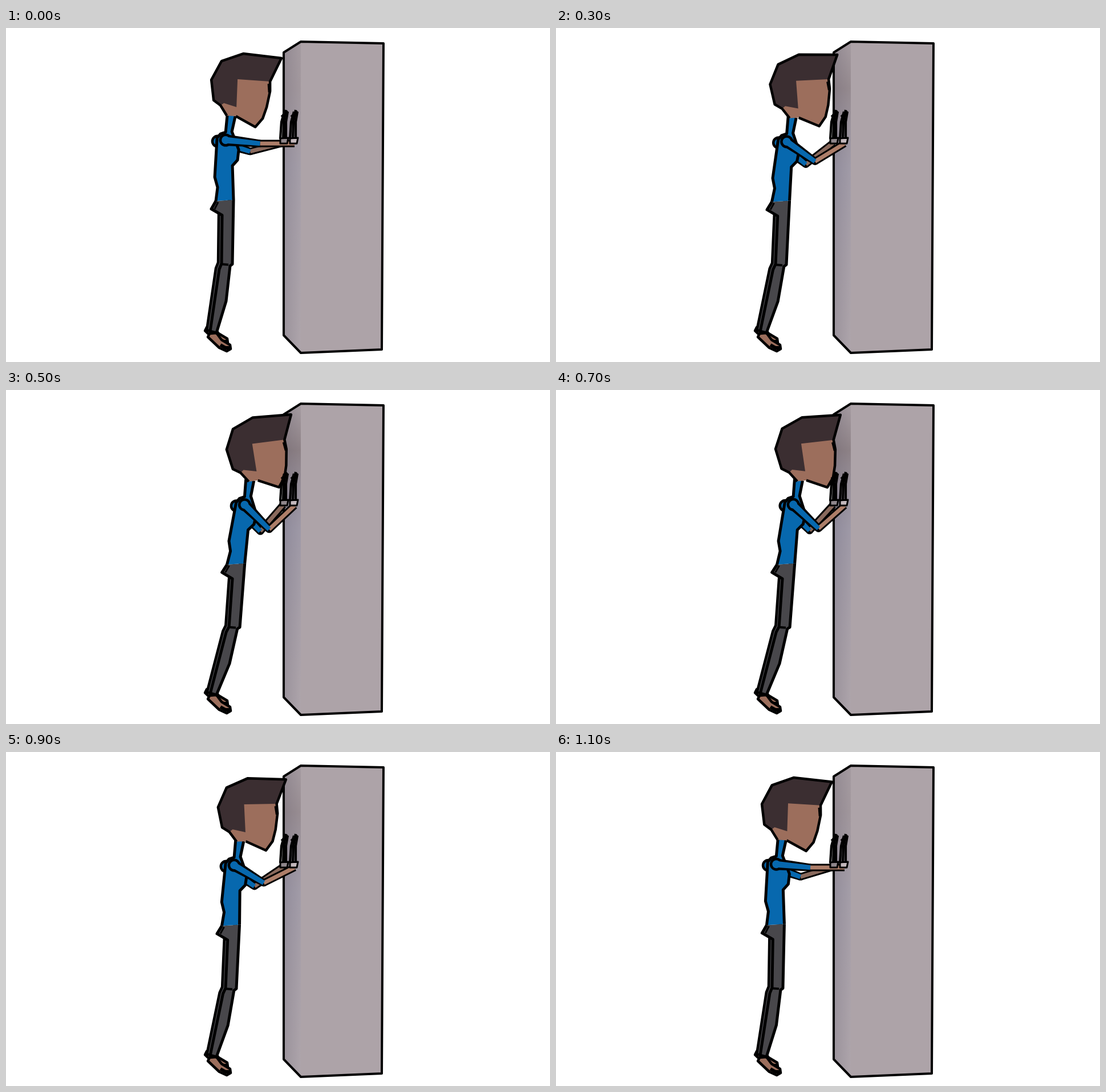
An HTML page with a canvas for the animation above (1.2 s loop, 954 px wide and 587 px high).

```html
<!DOCTYPE html>
<html lang="en">
<head>
<meta charset="utf-8">
<title>Wall push-up</title>
<style>
  html, body { margin: 0; width: 100%; height: 100%; overflow: hidden; background: #fff; }
  canvas { display: block; }
</style>
</head>
<body>
<canvas id="stage" width="954" height="587"></canvas>
<script>
const ctx = document.getElementById('stage').getContext('2d');
const LOOP = 1200, STEP = 100;
const INK = '#000', HAIR = '#3b2e31', SKIN = '#9c6e5c', BLUE = '#0768ae', PANTS = '#48474b';
const ARM = 59;       // length of upper arm and of forearm
const LEAD = 25;      // ms by which the upper body runs ahead of the hips

const swing = t => (1 - Math.cos(2 * Math.PI * t / LOOP)) / 2;
const mix = (a, b, u) => a + (b - a) * u;
const move = (pts, dx, dy) => pts.map(([x, y]) => [x + dx, y + dy]);

// Body points slide sideways by an amount that depends on their height
function leaner(top, low) {
  const joints = [[155, 34 * top], [195, 35 * top], [303, 21 * low], [415, 14 * low], [535, 0]];
  return ([x, y]) => {
    let i = 0;
    while (i < 3 && y > joints[i + 1][0]) i++;
    const [y0, d0] = joints[i], [y1, d1] = joints[i + 1];
    const d = mix(d0, d1, Math.max(0, Math.min(1, (y - y0) / (y1 - y0))));
    return [x + d, y + d * 0.14];
  };
}

// The elbow hangs below the line from shoulder to wrist
function elbowOf([ax, ay], [bx, by]) {
  const dx = bx - ax, dy = by - ay, reach = Math.hypot(dx, dy);
  const drop = Math.sqrt(Math.max(0, ARM * ARM - reach * reach / 4)) + 3;
  return [(ax + bx) / 2 - dy / reach * drop, (ay + by) / 2 + dx / reach * drop];
}

function trace(pts) {
  ctx.beginPath();
  pts.forEach(([x, y]) => ctx.lineTo(x, y));
}
function fill(pts, color) {
  trace(pts);
  ctx.fillStyle = color;
  ctx.fill();
}
function line(pts, width = 5, closed = false) {
  trace(pts);
  if (closed) ctx.closePath();
  ctx.lineWidth = width;
  ctx.strokeStyle = INK;
  ctx.stroke();
}
function shape(pts, color, width = 5, closed = true) {
  fill(pts, color);
  line(pts, width, closed);
}
function dot([x, y], r, color) {
  ctx.beginPath();
  ctx.arc(x, y, r, 0, Math.PI * 2);
  ctx.fillStyle = color;
  ctx.fill();
}
function limb(a, b, wa, wb, color) {
  const dx = b[0] - a[0], dy = b[1] - a[1], len = Math.hypot(dx, dy);
  const side = ([x, y], w) => [x - dy / len * w / 2, y + dx / len * w / 2];
  fill([side(a, wa), side(b, wb), side(b, -wb), side(a, -wa)], color);
}

function drawArm(shoulder, wrist, skin) {
  const elbow = elbowOf(shoulder, wrist);
  dot(shoulder, 11.5, INK);
  limb(shoulder, elbow, 20, 13, INK);
  dot(elbow, 6.5, INK);
  limb(elbow, wrist, 13, 13, INK);
  limb(elbow, wrist, 7, 7, skin);
  limb(shoulder, elbow, 11, 8, BLUE);
  dot(shoulder, 7, BLUE);
}

function drawBlock(near) {
  const outline = [[517, 24], [662, 27], [659, 565], [517, 571], [487, 540], [487, 43]];
  fill(outline, '#ada3a8');
  const edge = ctx.createLinearGradient(487, 0, 517, 0);
  edge.addColorStop(0, '#9b939c');
  edge.addColorStop(1, '#aea5ab');
  const shade = ctx.createLinearGradient(0, 30, 0, 571);
  shade.addColorStop(0, 'rgba(75,58,60,.1)');
  shade.addColorStop(0.14, `rgba(75,58,60,${mix(0.12, 0.35, near)})`);
  shade.addColorStop(0.4, `rgba(95,105,150,${mix(0.12, 0.2, near)})`);
  shade.addColorStop(1, 'rgba(120,115,135,0)');
  for (const paint of [edge, shade]) {
    fill([[487, 43], [517, 24], [517, 571], [487, 540]], paint);
  }
  line(outline, 4, true);
}

function drawLegs(at) {
  const foot = [[357, 537], [354, 543], [374, 562], [387, 568], [394, 564], [393, 557], [378, 548], [369, 536]];
  const leg = [[399, 302], [397, 415], [393, 418], [386, 480], [369, 536],
    [358, 533], [374, 424], [378, 414], [379, 329]];
  const hip = [[360, 318], [368, 304]];
  for (const [dx, dy] of [[-5, -11], [0, 0]]) {
    shape(move(foot, dx, dy), SKIN, 4.5);
    line(move([[376, 557], [385, 562], [393, 562]], dx, dy), 6);
  }
  shape(move(leg, -6, -2).map(at), PANTS, 4.5);
  shape(leg.concat(hip).map(at), PANTS, 5, false);
  line([[372, 306], [366, 318]].map(at), 3);
  line([[377, 415], [390, 416]].map(at), 4);
}

function drawTorso(at) {
  const back = [[368, 304], [371, 280], [366, 262], [370, 193], [376, 186], [385, 183], [388, 152]].map(at);
  const front = [[402, 155], [396, 182], [408, 214], [406, 232], [397, 242], [399, 302]].map(at);
  fill(back.concat(front), BLUE);
  line(back);
  line(front);
}

function drawHead(lean) {
  ctx.save();
  ctx.translate(424 + 26.5 * lean, 90.5 + lean);
  ctx.rotate(-11.8 * lean * Math.PI / 180);
  ctx.translate(-424, -90.5);
  const crown = [[463, 94], [483, 53], [416, 45], [378, 58], [360, 91], [364, 127], [376, 136]];
  const jaw = [[387, 154], [403, 155], [437, 174], [450, 159], [457, 139], [463, 111]];
  fill(crown.concat(jaw), SKIN);
  fill(crown.concat([[382, 132], [404, 139], [406, 90]]), HAIR);
  line([...jaw.slice(1), ...crown, jaw[0]], 4.5);
  line([[461, 98], [462, 113]], 5);
  ctx.restore();
}

function drawHands() {
  for (const [x, palm] of [[481, '#8f868b'], [498, '#c3b8bc']]) {
    shape([[x, 194], [x + 14, 193], [x + 12, 203], [x, 203]], palm, 3);
    for (let i = 0; i < 3; i++) {
      line([[x + 5 * i, 195], [x + 2 + 4 * i, 165], [x + 7 + 3 * i, 147 - 3 * (i % 2)]], 4.2);
    }
    line([[x + 2, 156], [x + 13, 146]], 4);
  }
}

function draw(t) {
  const top = swing(t + LEAD), low = swing(t);
  const at = leaner(top, low);
  ctx.fillStyle = '#fff';
  ctx.fillRect(0, 0, 954, 587);
  ctx.lineJoin = 'round';
  drawBlock(top);
  drawArm(at([371, 199]), [486, 202], '#8a6a5d');
  drawLegs(at);
  drawTorso(at);
  drawHead(top);
  drawArm(at([385, 197]), [506, 203], '#ad7e69');
  drawHands();
}

function tick() {
  const t = performance.now() % LOOP;
  draw(Math.floor(t / STEP) * STEP);
  requestAnimationFrame(tick);
}
tick();
</script>
</body>
</html>
```
